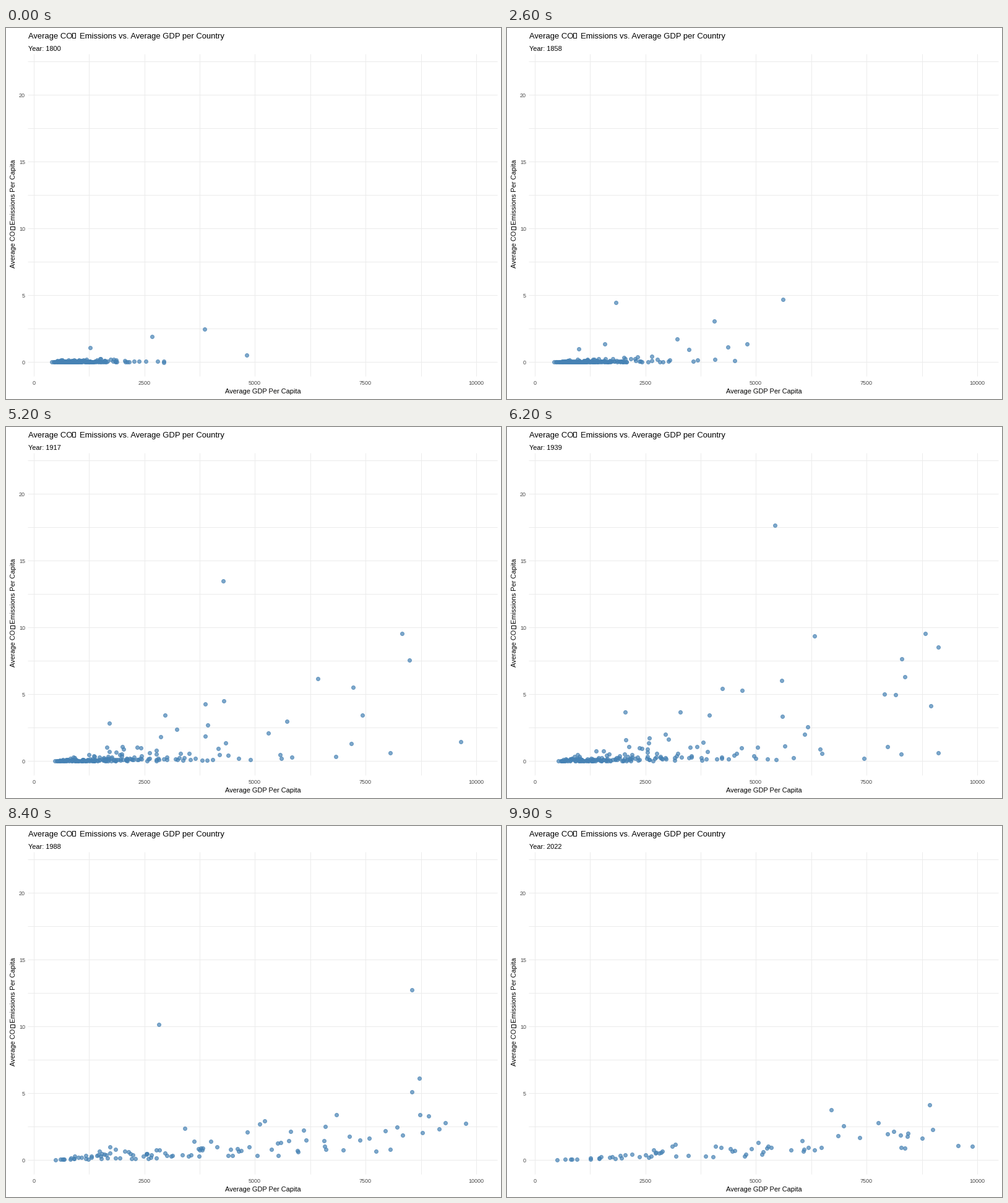
Animation of 800 by 600 pixels, one loop 10000 ms. Source, as a matplotlib script:

```python
import matplotlib.pyplot as plt
import numpy as np
from matplotlib.animation import FuncAnimation
from matplotlib.patches import Rectangle

W, H, DPI = 800, 600, 100
PX = 72 / DPI
FRAMES = 100
X0, Y0 = 45.5, 540.5            # plot origin on the stage
X_UNIT, Y_UNIT = 0.0715, 21.6   # pixels per dollar and per tonne
X_MAX = X0 + 10000 * X_UNIT
BLUE = "#4682B4"

plt.rcParams["font.family"] = "Liberation Sans"

# Moments (in frames) at which trends change pace.
KEYS = np.array([0, 26, 41, 62, 74, 84, 99])

# Countries far from the crowd: first key, then a path of stage positions.
LEADERS = [
    (0, [(320, 486), (445, 438), (600, 335), (675, 333)]),
    (0, [(235, 498), (334, 473), (487, 407), (627, 432)]),
    (0, [(388, 528), (387, 510), (457, 483), (684, 450)]),
    (0, [(254, 540), (356, 515), (602, 400), (696, 355)]),
    (0, [(152, 534), (293, 519), (357, 442), (637, 374)]),
    (0, [(135, 516), (157, 510), (232, 472), (279, 460), (547, 370),
         (655, 264)]),
    (1, [(274, 502), (258, 473), (379, 425), (482, 390)]),
    (3, [(432, 158), (553, 296)]),
    (3, [(190, 460), (151, 463), (246, 320)]),
]


def full_path(start, path):
    """One position per key: out of the crowd first, off to the right last."""
    base = np.array([90, 538])
    rise = np.linspace(0, 0.5, start)[:, None]
    before = base + (np.array(path[0]) - base) * rise
    after = [(840, path[-1][1])] * (len(KEYS) - start - len(path))
    return np.vstack([before, path, *after]) + 0.5


PATHS = np.array([full_path(*leader) for leader in LEADERS])

# The crowd: shifted log-normal incomes, emissions as a power of income.
N = 180
CROWD = {
    "floor":  [220, 230, 250, 420, 400, 350, 300],
    "mean":   [6.6, 6.85, 6.95, 7.3, 8.15, 8.8, 9.6],
    "spread": [0.52, 0.58, 0.7, 1.0, 1.25, 1.45, 1.55],
    "level":  [0.06, 0.08, 0.13, 0.25, 0.4, 0.45, 0.32],
    "power":  [0.3, 1.0, 1.4, 1.4, 1.5, 1.3, 1.5],
    "jitter": [0.8, 1.0, 1.2, 1.2, 0.85, 0.65, 0.5],
}
rng = np.random.default_rng(7)
u = (np.arange(N) + rng.random(N)) / N
WEALTH = 5.06 * (u**0.135 - (1 - u)**0.135)   # near-normal quantiles
CARBON = np.clip(rng.normal(size=N), -1.8, 1.8)
PHASE = rng.uniform(0, 2 * np.pi, N)


def crowd(i):
    p = {name: np.interp(i, KEYS, v) for name, v in CROWD.items()}
    wealth = WEALTH + 0.08 * np.sin(PHASE + i / 15)
    carbon = CARBON + 0.2 * np.cos(PHASE + i / 12)
    gdp = p["floor"] + np.exp(p["mean"] + p["spread"] * wealth)
    co2 = p["level"] * (gdp / 2500)**p["power"] * np.exp(p["jitter"] * carbon)
    return np.column_stack([X0 + gdp * X_UNIT, Y0 - co2 * Y_UNIT])


def leaders(i):
    k = min(np.searchsorted(KEYS, i, side="right") - 1, len(KEYS) - 2)
    f = (i - KEYS[k]) / (KEYS[k + 1] - KEYS[k])
    return PATHS[:, k] * (1 - f) + PATHS[:, k + 1] * f


fig = plt.figure(figsize=(W / DPI, H / DPI), dpi=DPI, facecolor="white")
ax = fig.add_axes([0, 0, 1, 1])
ax.set(xlim=(0, W), ylim=(H, 0))
ax.axis("off")


def label(x, y, text, size, color="black", **kw):
    return ax.text(x, y, text, fontsize=size * PX, color=color,
                   va="baseline", **kw)


def grid_line(xs, ys):
    ax.plot(xs, ys, color="#EBEBEB", lw=PX, snap=False, zorder=1)


def missing_glyph(x, y, w, h):
    ax.add_patch(Rectangle((x, y), w, h, fill=False, ec="black", lw=PX,
                           snap=False))


for n in range(9):
    x = round(X0 - 0.5 + n * 1250 * X_UNIT) + 0.5
    grid_line([x, x], [43, 563])
    if n % 2 == 0:
        label(x - 0.5, 577, str(n * 1250), 9, "#4D4D4D", ha="center")
for n in range(10):
    y = Y0 - n * 54
    grid_line([36, 794], [y, y])
    if n % 2 == 0:
        label(31, y + 4, f"{n * 2.5:.0f}", 9, "#4D4D4D", ha="right")

label(36, 17, "Average CO", 13)
missing_glyph(107.5, 8.5, 5, 8)
label(353, 17, "Emissions vs. Average GDP per Country", 13, ha="right")
year = label(36, 37, "", 11)
label(415.5, 591, "Average GDP Per Capita", 11, ha="center")
side = dict(rotation=90, rotation_mode="anchor")
label(15, 388.5, "Average CO", 11, **side)
missing_glyph(7.5, 321.5, 7, 5)
label(15, 213, "Emissions Per Capita", 11, ha="right", **side)

dots = ax.scatter([], [], s=(6 * PX)**2, color=BLUE, alpha=0.7,
                  linewidths=PX, zorder=3)


def draw(i):
    pts = np.vstack([crowd(i), leaders(i)])
    dots.set_offsets(pts[pts[:, 0] <= X_MAX])
    year.set_text(f"Year: {1800 + round(i * 222 / (FRAMES - 1))}")
    return dots, year


anim = FuncAnimation(fig, draw, frames=FRAMES, interval=100,
                     repeat=True, repeat_delay=0)
plt.show()
```
